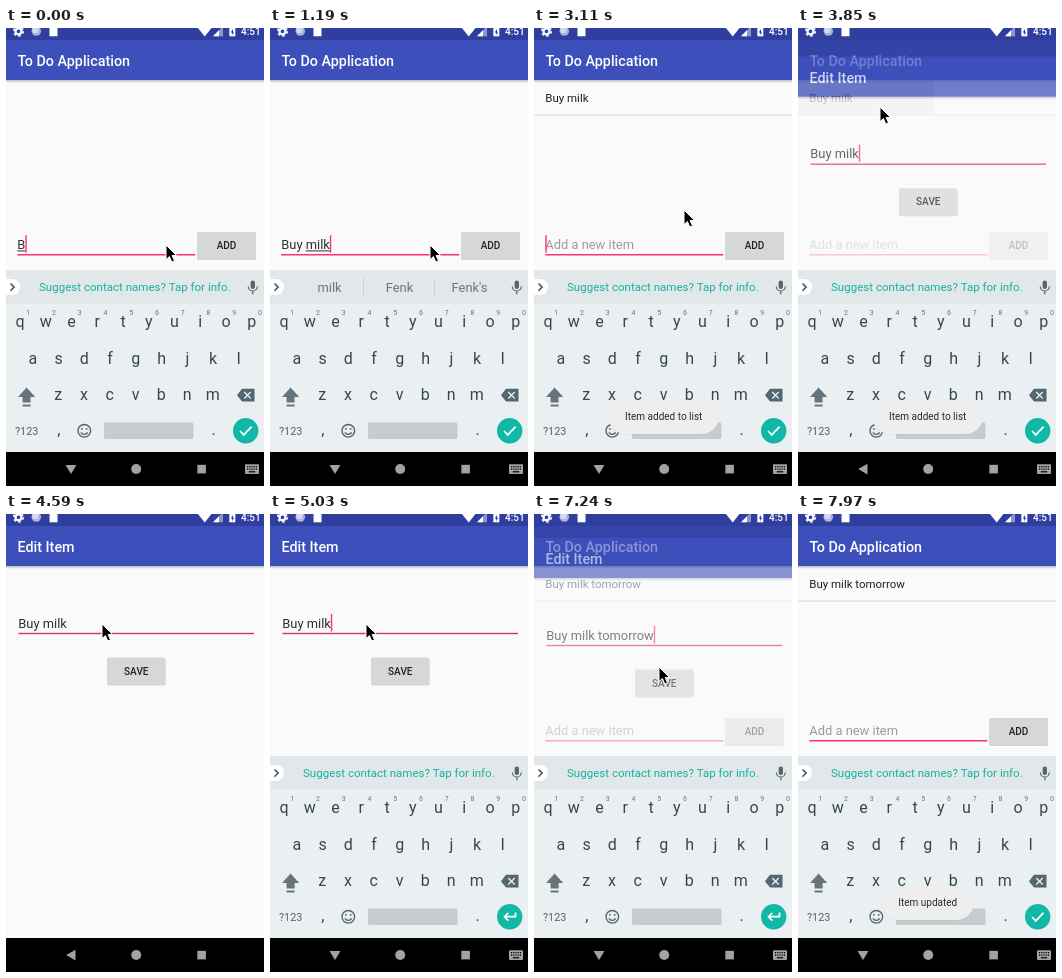
These frames come from a looping animation (258x458 px, 8 s). An HTML page:

```html
<!DOCTYPE html>
<html lang="en">
<head>
<meta charset="utf-8">
<title>To-do list demo</title>
<style>
  html, body { margin: 0; width: 100%; height: 100%; overflow: hidden; background: #fafafa; }
  svg { display: block; width: 100%; height: 100%; }
  text { font-family: Roboto, sans-serif; white-space: pre; }
  .title { font-size: 14.33px; font-weight: 500; fill: #fff; }
  .field { font-size: 12.9px; fill: #303030; }
  .row { font-size: 11.47px; fill: #222; }
  .button { font-size: 10px; font-weight: 500; fill: #222; text-anchor: middle; }
  .key { font-size: 16px; fill: #37474f; text-anchor: middle; }
  .digit { font-size: 7px; fill: #66757d; text-anchor: middle; }
  .word { font-size: 12.9px; fill: #66757d; text-anchor: middle; }
  .toast { font-size: 10px; fill: #2b2b2b; text-anchor: middle; }
</style>
</head>
<body>
<svg viewBox="0 0 258 458">
  <defs>
    <linearGradient id="shade" x2="0" y2="1">
      <stop stop-opacity=".25"/><stop offset="1" stop-opacity="0"/>
    </linearGradient>
  </defs>

  <g id="main">
    <rect y="52" width="258" height="372" fill="#fafafa"/>
    <g id="row">
      <rect id="ripple" y="52" width="136" height="35" opacity=".09"/>
      <text id="item" class="row" x="11.3" y="74"></text>
      <rect y="86.6" width="258" height="1" fill="#dadada"/>
    </g>
    <rect y="12" width="258" height="40" fill="#3d4fbb"/>
    <rect y="52" width="258" height="3" fill="url(#shade)"/>
    <text class="title" x="11.5" y="38">To Do Application</text>
    <text id="hint" class="field" x="11.3" y="221" style="fill:#9c9c9c">Add a new item</text>
    <g id="addField"></g>
    <rect x="11.3" y="226" width="178" height="1.5" fill="#ff2f7c"/>
    <rect x="191" y="205" width="59" height="27" rx="1.5" opacity=".16"/>
    <rect id="addButton" x="191" y="204" width="59" height="27" rx="1.5" fill="#d6d7d7"/>
    <text class="button" x="220.5" y="221">ADD</text>
  </g>

  <g id="edit">
    <rect y="52" width="258" height="400" fill="#fafafa"/>
    <rect y="-5" width="258" height="17" fill="#303f9f"/>
    <rect y="12" width="258" height="40" fill="#3d4fbb"/>
    <rect y="52" width="258" height="3" fill="url(#shade)"/>
    <text class="title" x="11.5" y="38">Edit Item</text>
    <g id="editField"></g>
    <rect x="12.5" y="118.8" width="235.5" height="1.4" fill="#d0386c"/>
    <rect x="101" y="144.5" width="58.5" height="27" rx="1.5" opacity=".16"/>
    <rect id="saveButton" x="101" y="143.5" width="58.5" height="27" rx="1.5" fill="#d6d7d7"/>
    <text class="button" x="130.3" y="160.8">SAVE</text>
  </g>

  <g id="keyboard">
    <rect y="242" width="258" height="182" fill="#eaeff1"/>
    <rect y="242" width="258" height="33.5" fill="#e2e7e9"/>
    <path d="M0 251H6a8 8 0 0 1 0 16H0z" fill="#fff"/>
    <path d="M4.5 255.5l3.7 3.6l-3.7 3.6" fill="none" stroke="#46545c" stroke-width="1.5"/>
    <text id="prompt" x="33" y="263.3" font-size="11.55" fill="#12b3a2">Suggest contact names? Tap for info.</text>
    <g id="words">
      <path d="M93.5 250v18M164.5 250v18" stroke="#cbd1d4"/>
    </g>
    <g fill="#546670">
      <rect x="244.6" y="252.5" width="4.4" height="8.5" rx="2.2"/>
      <path d="M242.3 258.5a4.5 4.5 0 0 0 9 0M246.8 263v3.2" fill="none" stroke="#546670" stroke-width="1.2"/>
      <path d="M20.6 359.5L12 369h4.6v5.6h8V369h4.6zM16.6 376.4h8v2h-8z" fill="#66757d"/>
      <path d="M231 367.2l5-6.4h12.5v12.8H236z"/>
      <path d="M238.3 364l6.4 6.4m0-6.4l-6.4 6.4" stroke="#eaeff1" stroke-width="1.4"/>
    </g>
    <text x="9" y="407" font-size="10.8" fill="#53626a">?123</text>
    <g fill="none" stroke="#546670" stroke-width="1.4">
      <circle cx="78.3" cy="402.8" r="6.3"/>
      <path d="M75 404.4a3.6 3.3 0 0 0 6.6 0M76 400v1.8M80.6 400v1.8"/>
    </g>
    <rect x="98" y="394.5" width="89.5" height="16.5" rx="1.5" fill="#c6ccce"/>
    <circle cx="239.7" cy="402.7" r="12.7" fill="#12b8a6"/>
    <g fill="none" stroke="#fff" stroke-width="1.7">
      <path id="check" d="M234 403l3.8 3.9l7.8-8.3"/>
      <path id="enter" d="M245.5 398.5v4.2h-11m3.8-3.9l-3.8 3.9l3.8 3.9"/>
    </g>
  </g>

  <g id="toast">
    <rect id="pillShade" y="372.5" height="34" rx="17" opacity=".06"/>
    <rect id="pill" y="372" height="34" rx="17" fill="#eeeeee"/>
    <text id="message" class="toast" x="129.7" y="392.4"></text>
  </g>

  <rect width="258" height="12" fill="#303f9f"/>
  <g fill="#fff">
    <circle cx="12.5" cy="3.3" r="3" fill="none" stroke="#fff" stroke-width="2.3"/>
    <circle cx="12.5" cy="3.3" r="4.8" fill="none" stroke="#fff" stroke-width="1.5" stroke-dasharray="2.5 2.53"/>
    <circle cx="30.3" cy="3" r="4.8" fill="#a9b1dc"/>
    <circle cx="29.4" cy="2" r="3.2" fill="#d5d9ee"/>
    <path d="M43.5 0h8v8.3h-8z"/>
    <path d="M192 0h13.5l-6.8 8.6z"/>
    <path d="M207 8.3L217 -1.7v10z" opacity=".45"/>
    <path d="M207 8.3l6-6v6z"/>
    <path d="M223.3 0h6v8.3h-6z"/>
    <path d="M227 1l-2.3 3.6h1.5V7.3l2-3.6h-1.2z" fill="#303f9f"/>
    <text x="235" y="7.3" font-size="10" font-weight="500">4:51</text>
  </g>

  <rect y="424" width="258" height="34"/>
  <g fill="#a2a2a2">
    <path id="backDown" d="M59.5 437h11l-5.5 9z"/>
    <path id="backLeft" d="M69.5 435.8v10.6l-9.3-5.3z"/>
    <circle cx="130.2" cy="441" r="5"/>
    <rect x="191.3" y="436.8" width="8.6" height="8.6"/>
    <g id="imeIcon">
      <rect x="239" y="436.3" width="14" height="9.6" rx="1"/>
      <path d="M241 438.7h10M241 441.2h10" stroke="#000" stroke-width="1.2" stroke-dasharray="1.2 1"/>
      <path d="M242.8 443.8h6.4" stroke="#000" stroke-width="1.2"/>
    </g>
  </g>

  <path id="mouse" d="M0 0V14.6L3.4 11.5L5.8 17L8.5 15.8L6.1 10.5H10.6Z" stroke="#fff"/>
</svg>

<script>
const $ = id => document.getElementById(id);

function add(parent, tag, attrs, content = '') {
  const node = document.createElementNS('http://www.w3.org/2000/svg', tag);
  for (const name in attrs) node.setAttribute(name, attrs[name]);
  node.textContent = content;
  return parent.appendChild(node);
}

function set(id, attrs) {
  for (const name in attrs) $(id).setAttribute(name, attrs[name]);
}

const show = (id, on) => { $(id).style.display = on ? '' : 'none'; };

const pen = document.createElement('canvas').getContext('2d');
function widthOf(text, size) {
  pen.font = `${size}px Roboto, sans-serif`;
  return pen.measureText(text).width;
}

// Keyboard letters
const pitch = 25.75;
[['qwertyuiop', 14, 299], ['asdfghjkl', 26.8, 335.5], ['zxcvbnm', 52.3, 372]].forEach(([letters, x, y], row) => {
  [...letters].forEach((letter, i) => {
    add($('keyboard'), 'text', { class: 'key', x: x + i * pitch, y }, letter);
    if (!row) add($('keyboard'), 'text', { class: 'digit', x: 22.3 + i * pitch, y: 287 }, (i + 1) % 10);
  });
});
add($('keyboard'), 'text', { class: 'key', x: 52.8, y: 407 }, ',');
add($('keyboard'), 'text', { class: 'key', x: 207.5, y: 407 }, '.');

const words = [59.5, 129.5, 199.5].map(x => add($('words'), 'text', { class: 'word', x, y: 263.8 }));

function makeField(parent, x, y) {
  const label = add(parent, 'text', { class: 'field', x, y });
  const line = add(parent, 'rect', { y: y + 1.4, height: 1, fill: '#303030' });
  const caret = add(parent, 'rect', { y: y - 13.8, width: 1.4, height: 17.5, fill: '#ff2f7c' });
  return (text, composing, blinkOn) => {
    label.textContent = text;
    const end = widthOf(text, 12.9);
    const start = widthOf(text.slice(0, text.lastIndexOf(' ') + 1), 12.9);
    line.setAttribute('x', x + start);
    line.setAttribute('width', composing ? end - start : 0);
    caret.setAttribute('x', x + end);
    caret.setAttribute('opacity', blinkOn);
  };
}
const drawAdd = makeField($('addField'), 11.3, 221);
const drawEdit = makeField($('editField'), 12.3, 113.7);

const long = 'Buy milk tomorrow';
const typed = n => long.slice(0, n);

// Each step changes some of the state; the rest carries over.
const steps = [
  [0, { entry: typed(1), value: typed(8), composing: 1, caret: 1, mouse: [160, 217], item: '', ripple: 0,
        press: '', words: '', toast: '', toastAlpha: 0, edit: [0, 0], keys: 0, left: 0, ime: 1, enter: 0 }],
  [140, { entry: typed(2) }],
  [440, { entry: typed(3), words: 'Buy|But|Buying' }],
  [590, { entry: typed(4), words: 'a|the|it' }],
  [740, { entry: typed(5), words: 'm|my|more' }],
  [890, { entry: typed(6), words: 'mi|my|mind' }],
  [1040, { entry: typed(7), words: 'mil|milk|mill' }],
  [1190, { entry: typed(8), words: "milk|Fenk|Fenk's" }],
  [1480, { mouse: [172, 218] }],
  [1630, { mouse: [194, 219] }],
  [1780, { mouse: [211, 218] }],
  [1930, { mouse: [215, 217] }],
  [2080, { press: 'add' }],
  [2230, { press: '', entry: '', item: typed(8), words: '' }],
  [2370, { toast: 'Item added to list', toastAlpha: .7, mouse: [208, 214] }],
  [2520, { toastAlpha: 1, mouse: [190, 205] }],
  [2660, { caret: 0 }],
  [3110, { caret: 1, mouse: [150, 182] }],
  [3260, { mouse: [118, 140] }],
  [3410, { mouse: [92, 96] }],
  [3560, { mouse: [82, 79] }],
  [3700, { ripple: 1 }],
  [3850, { edit: [.73, 16.7], left: 1, composing: 0 }],
  [4000, { edit: [1, 0], keys: 70 }],
  [4140, { keys: 190, ime: 0, ripple: 0, mouse: [83, 85] }],
  [4290, { toastAlpha: .5, mouse: [87, 95] }],
  [4440, { toastAlpha: 0, mouse: [93, 105] }],
  [4590, { caret: 0, mouse: [96, 110] }],
  [4880, { caret: 1, keys: 50, enter: 1, left: 0, ime: 1 }],
  [5030, { keys: 0 }],
  [5620, { value: typed(9), words: 'and|for|in' }],
  [5770, { value: typed(10), composing: 1, words: 't|to|the' }],
  [5920, { value: typed(11), words: 'to|too|the' }],
  [6070, { value: typed(12), words: typed(12).slice(9) + '|*Kem|to' }],
  [6220, { value: typed(13), words: 'tomo|*tomorrow|tomato' }],
  [6360, { value: typed(15), words: 'tomorr|*tomorrow|tomorrows' }],
  [6510, { value: long, words: 'tomorrow|tomorrows|today' }],
  [6800, { mouse: [108, 130] }],
  [6950, { mouse: [125, 153] }],
  [7100, { press: 'save' }],
  [7240, { press: '', edit: [.6, 12], words: '', item: long, composing: 0 }],
  [7390, { edit: [0, 0], enter: 0 }],
  [7530, { toast: 'Item updated', toastAlpha: .7, mouse: [165, 158] }],
  [7680, { toastAlpha: 1, mouse: [222, 165] }],
  [7820, { mouse: [290, 170] }],
  [7970, { caret: 0 }]
];
const loopLength = 8000;

function stateAt(time) {
  const state = {};
  for (const [start, change] of steps) if (start <= time) Object.assign(state, change);
  return state;
}

function draw(s) {
  const [editAlpha, editY] = s.edit;
  drawAdd(s.entry, s.composing && s.entry, editAlpha ? 0 : s.caret);
  drawEdit(s.value, s.composing, s.caret);
  show('hint', !s.entry);
  show('row', s.item);
  show('ripple', s.ripple);
  $('item').textContent = s.item;
  set('addButton', { fill: s.press === 'add' ? '#bfc0c0' : '#d6d7d7' });
  set('saveButton', { fill: s.press === 'save' ? '#bfc0c0' : '#d6d7d7' });
  set('edit', { opacity: editAlpha, transform: `translate(0 ${editY})` });

  set('keyboard', { transform: `translate(0 ${s.keys})` });
  show('prompt', !s.words);
  show('words', s.words);
  s.words.split('|').forEach((word, i) => {
    words[i].textContent = word.replace('*', '');
    words[i].style.fontWeight = word.startsWith('*') ? 700 : 400;
  });
  show('check', !s.enter);
  show('enter', s.enter);

  const width = widthOf(s.toast, 10) + 33;
  for (const id of ['pill', 'pillShade']) set(id, { x: 129.7 - width / 2, width });
  $('message').textContent = s.toast;
  set('toast', { opacity: s.toastAlpha });

  show('backDown', !s.left);
  show('backLeft', s.left);
  show('imeIcon', s.ime);
  set('mouse', { transform: `translate(${s.mouse})` });
}

const origin = performance.now();
function tick() {
  draw(stateAt((performance.now() - origin) % loopLength));
  requestAnimationFrame(tick);
}
tick();
</script>
</body>
</html>
```
